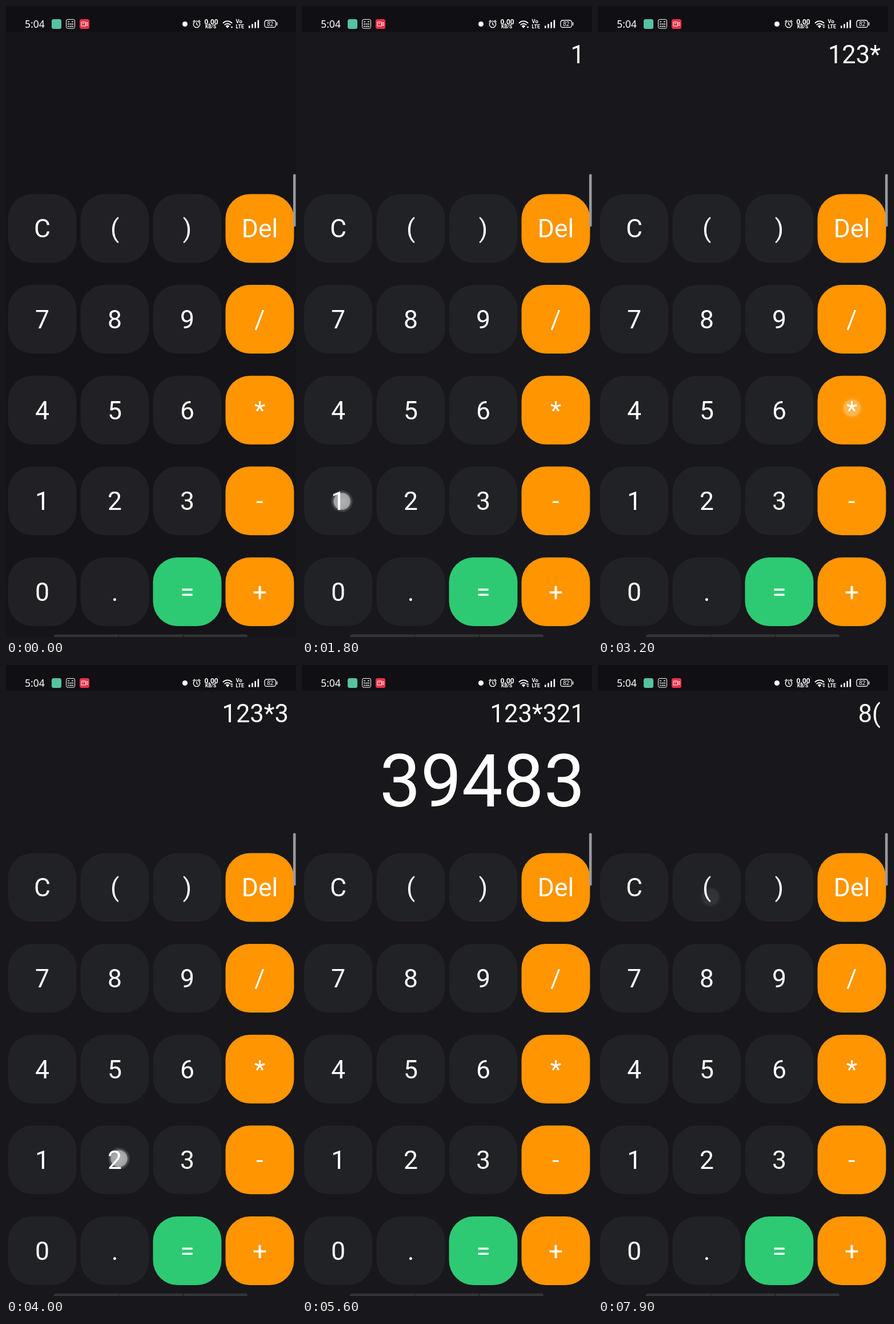
An HTML page that plays this animation: 508 px wide and 1102 px high, repeating every 8000 ms.

```html
<!DOCTYPE html>
<html lang="en">
<head>
<meta charset="utf-8">
<title>Calculator</title>
<style>
  html, body { margin: 0; width: 100%; height: 100%; overflow: hidden; background: #18171b; }
  svg { display: block; width: 508px; height: 1102px; }
  text { fill: #fff; font-family: Roboto, sans-serif; }
  .key { font-size: 44.5px; text-anchor: middle; }
  .right { text-anchor: end; }
  .line { fill: none; stroke: #fff; stroke-width: 1.4; stroke-linecap: round; }
  .bold { font-weight: 700; }
</style>
</head>
<body>
<svg viewBox="0 0 508 1102">
  <defs>
    <radialGradient id="glow">
      <stop offset="0" stop-color="#fff" stop-opacity=".66"/>
      <stop offset=".7" stop-color="#fff" stop-opacity=".58"/>
      <stop offset=".76" stop-color="#fff" stop-opacity=".24"/>
      <stop offset="1" stop-color="#fff" stop-opacity="0"/>
    </radialGradient>
  </defs>
  <rect id="body" width="508" height="1102"/>
  <rect width="508" height="45" fill="#100f13"/>

  <g id="status">
    <text x="33" y="38" style="font:17.5px 'Noto Sans',sans-serif">5:04</text>
    <rect x="80" y="23" width="17" height="17" rx="3.5" fill="#56c3a0"/>
    <rect x="105.5" y="23.5" width="15" height="15.5" rx="2.5" class="line" style="stroke-width:1"/>
    <path d="M108.5 27.5h2m5 0h2M108.5 31.5h2m1.8 0h2m1.5 0h2M108.5 35.5h2m1.8 0h2m1.5 0h2" class="line" stroke-linecap="butt"/>
    <rect x="129" y="23" width="17" height="17" rx="3.5" fill="#ee2f48"/>
    <path d="M132.5 28h7v7h-7zM139.5 31l3.5-2.5v6l-3.5-2.5M134.5 30.5h2" class="line" style="stroke-width:1"/>
    <circle cx="313.5" cy="31.5" r="4.5" fill="#fff"/>
    <circle cx="334" cy="32" r="5.6" class="line"/>
    <path d="M334 29v3.2l2 1.6M327.8 27.3l2.6-2.2M340.2 27.3l-2.6-2.2" class="line"/>
    <g class="bold">
      <text x="347.5" y="31.5" font-size="12">0.00</text>
      <text x="349" y="39.3" font-size="8.5">KB/S</text>
      <text x="402.5" y="30.3" font-size="9.5">Vo</text>
      <text x="402.5" y="39.3" font-size="9">LTE</text>
    </g>
    <path d="M380.5 29.5a10.5 10.5 0 0 1 15 0M383.2 32.7a7 7 0 0 1 9.6 0" class="line" style="stroke-width:1.8"/>
    <path d="M384.8 35a4.8 4.8 0 0 1 6.4 0l-3.2 3.8z" fill="#fff"/>
    <path d="M393.3 36h4.4l-2.2 2.8z" fill="#fff"/>
    <path id="upload" d="M393.3 34.6h4.4l-2.2-2.8z" fill="#fff"/>
    <path d="M425 34.5h2.6v4h-2.6zM430.2 31.5h2.6v7h-2.6zM435.4 28h2.6v10.5h-2.6zM440.6 24.5h2.6v14h-2.6z" fill="#fff"/>
    <rect x="453" y="25" width="19.5" height="12.3" rx="3.6" class="line" style="stroke-width:1.3"/>
    <path d="M474.6 29v4.4" class="line"/>
    <text x="462.8" y="34.8" font-size="10" text-anchor="middle">82</text>
  </g>

  <text id="expression" class="right" x="495" y="99.7" font-size="43.5"></text>
  <text id="result" class="right" x="495.6" y="246.5" font-size="128"></text>
  <g id="keys"></g>
  <rect x="503" y="293.5" width="4.5" height="92" rx="2" fill="#9a9a9c"/>
  <path d="M86 1097.5H196.500V1102H84V1099.500zM197.500 1097.500H310V1102H197.500zM311 1097.500H421L423 1099.500V1102H311z" fill="#343436"/>
  <g id="touches"></g>
</svg>
<script>
const LOOP = 8000;
const $ = id => document.getElementById(id);

function add(parent, tag, attrs, text = '') {
  const el = document.createElementNS('http://www.w3.org/2000/svg', tag);
  for (const name in attrs) el.setAttribute(name, attrs[name]);
  el.textContent = text;
  return parent.appendChild(el);
}

const darkKeys = [];
['C', '(', ')', 'Del', '7', '8', '9', '/', '4', '5', '6', '*',
 '1', '2', '3', '-', '0', '.', '=', '+'].forEach((label, i) => {
  const x = 3.5 + 127 * (i % 4), y = 328.5 + 158.6 * Math.floor(i / 4);
  const key = add($('keys'), 'rect', { x, y, width: 120, height: 120, rx: 43 });
  if (i % 4 === 3) key.setAttribute('fill', '#ff9500');
  else if (label === '=') key.setAttribute('fill', '#2ec973');
  else darkKeys.push(key);
  add($('keys'), 'text', { x: x + 60, y: y + 75.8, class: 'key' }, label);
});

// x, y, touch start, touch end, time the key acts, expression after it
const touches = [
  [70, 865, 1500, 2000, 1800, '1'],
  [189, 878, 2200, 2520, 2300, '12'],
  [315, 853, 2250, 2600, 2400, '123'],
  [445, 702, 3000, 3300, 3200, '123*'],
  [316, 860, 3600, 3900, 3800, '123*3'],
  [198, 862, 3800, 4200, 4100, '123*32'],
  [50, 878, 4100, 4400, 4300, '123*321'],
  [316, 1010, 4700, 5100, 5000, '123*321'],
  [54, 384, 6200, 6600, 6500, ''],
  [197, 546, 7100, 7500, 7400, '8'],
  [197, 405, 7600, 7925, 7800, '8(']
].map(([x, y, start, end, act, text]) => ({
  start, end, act, text,
  dot: add($('touches'), 'circle', { cx: x, cy: y, r: 20, fill: 'url(#glow)' })
}));

const clamp = v => Math.max(0, Math.min(1, v));
const mix = (a, b, k) => `rgb(${a.map((v, i) => Math.round(v + (b[i] - v) * k))})`;

function draw(now) {
  const t = Math.floor(now % LOOP / 100) * 100;
  const settle = clamp(t / 900);
  $('body').setAttribute('fill', mix([21, 20, 24], [24, 23, 27], settle));
  const keyColor = mix([33, 32, 37], [32, 34, 38], settle);
  darkKeys.forEach(key => key.setAttribute('fill', keyColor));

  let expression = '';
  for (const p of touches) {
    if (t >= p.act) expression = p.text;
    p.dot.setAttribute('opacity', clamp(Math.min((t - p.start) / 150, (p.end - t) / 200)));
  }
  $('expression').textContent = expression;
  $('result').textContent = t >= 5000 && t < 6500 ? 123 * 321 : '';
  $('upload').setAttribute('visibility', t >= 1900 ? 'visible' : 'hidden');
}

const begin = performance.now();
function frame() {
  draw(performance.now() - begin);
  requestAnimationFrame(frame);
}
frame();
</script>
</body>
</html>
```
